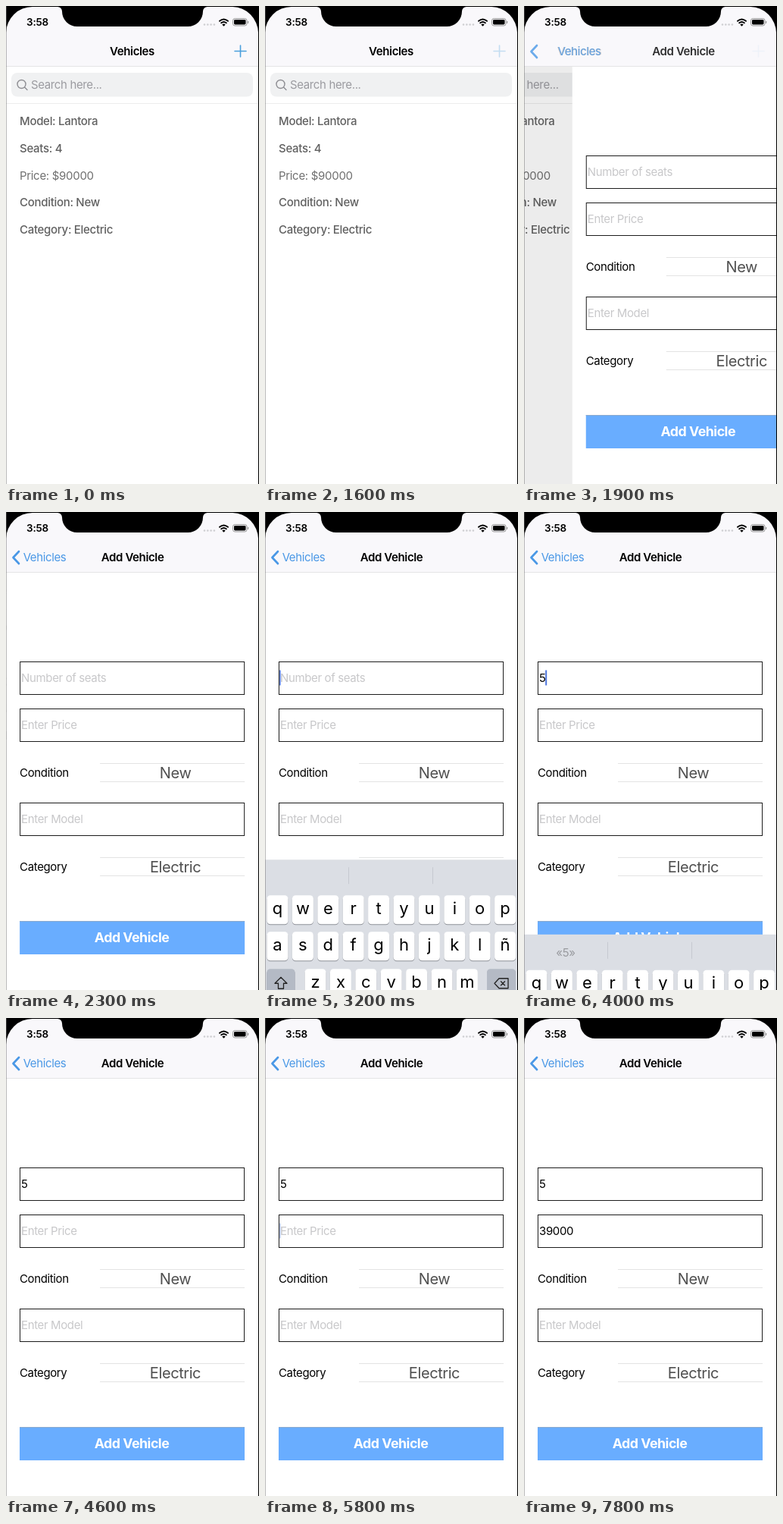
These frames come from a looping animation (334 px wide and 630 px high, 8000 ms). An HTML page:

```html
<!DOCTYPE html>
<html lang="en">
<head>
<meta charset="utf-8">
<title>Vehicles</title>
<style>
html, body { margin: 0; width: 100%; height: 100%; overflow: hidden; background: #fff }
svg { display: block; width: 334px; height: 630px }
text { font: 15px Inter, "Liberation Sans", sans-serif; letter-spacing: -.37px; white-space: pre }
.mid { text-anchor: middle }
.title { font-weight: 600 }
.cell { font-weight: 500; letter-spacing: -.3px; fill: #606060 }
.thin { font-weight: 400; fill: #707070 }
.hint { fill: #c8c8ca }
.pick { font-size: 20px; letter-spacing: -.4px; fill: #505050 }
.btn { font-size: 17.8px; font-weight: 700; letter-spacing: -.5px; fill: #fff }
.clock { font-size: 13.5px; font-weight: 600; letter-spacing: -.2px }
.key { font-size: 22px; letter-spacing: 0 }
.blue { fill: #4a98e6 }
.line { fill: none; stroke-linecap: round; stroke-linejoin: round }
</style>
</head>
<body>
<svg id="stage" viewBox="0 0 334 630"></svg>
<script>
const LOOP = 8000;
const text = (x, y, str, cls = '', extra = '') =>
  `<text x="${x}" y="${y}" class="${cls}" ${extra}>${str}</text>`;
const rect = (x, y, w, h, fill, extra = '') =>
  `<rect x="${x}" y="${y}" width="${w}" height="${h}" fill="${fill}" ${extra}/>`;
const line = (d, color, width) =>
  `<path class="line" d="${d}" stroke="${color}" stroke-width="${width}"/>`;

const cells = ['Model: Lantora', 'Seats: 4', 'Price: $90000', 'Condition: New', 'Category: Electric'];
const list = `<g id="list">
  ${rect(0, 80, 334, 550, '#fff')}
  ${rect(7, 88, 319, 31.5, '#f0f1f2', 'rx="8"')}
  ${line('M25 107.500l3 3M26 103a5.500 5.500 0 1 1-11 0a5.500 5.500 0 1 1 11 0', '#8e8e93', 1.4)}
  ${text(33, 108.5, 'Search here...', '', 'fill="#9b9ba0"')}
  ${rect(0, 128, 334, 1, '#ececec')}
  ${cells.map((s, i) => text(18, 157.3 + 35.7 * i, s, i == 2 ? 'cell thin' : 'cell')).join('')}
</g>`;

const field = (id, y, hint) =>
  rect(18.5, y + .5, 296, 43, '#fff', 'stroke="#1c1c1c"') +
  text(20, y + 27, hint, 'hint', `id="${id}Hint"`) +
  text(20, y + 27, '', '', `id="${id}"`);
const picker = (y, label, value) =>
  text(18, y + 18, label) + rect(124, y, 191, 1, '#e3e3e3') +
  rect(124, y + 24, 191, 1, '#e3e3e3') + text(223.5, y + 19.5, value, 'pick mid');
const form = `<g id="form">
  ${rect(0, 80, 334, 550, '#fff')}
  ${field('seats', 197, 'Number of seats')}
  ${field('price', 259, 'Enter Price')}
  ${picker(331, 'Condition', 'New')}
  ${field('model', 383, 'Enter Model')}
  ${picker(455, 'Category', 'Electric')}
  ${rect(18, 539, 297, 44, '#69adff')}${rect(18, 539, 297, 1, '#8aa9cd')}
  ${text(166, 567.3, 'Add Vehicle', 'btn mid')}
  ${rect(0, 0, 2, 20, '#4c74dc', 'id="caret"')}
</g>`;

const nav = rect(0, 0, 334, 79, '#f9f8fb') + rect(0, 79, 334, 1, '#e4e4e6') +
  `<g id="back">${line('M17 52l-7.500 8 7.500 8', '#4a98e6', 2.7)}</g>` +
  text(0, 65, 'Vehicles', 'title mid', 'id="oldTitle"') +
  text(0, 65, 'Vehicles', 'blue mid', 'id="backLabel"') +
  text(0, 65, 'Add Vehicle', 'title mid', 'id="newTitle"') +
  `<g id="plus">${line('M302 59.500h15M309.500 52v15', '#4a9fdc', 1.6)}</g>`;

const status = text(27, 26.3, '3:58', 'clock') +
  [262, 266.3, 270.6, 274.9].map(x => `<circle cx="${x}" cy="24.5" r="1.3" fill="#cfcfd2"/>`).join('') +
  line('M282 19.800q5.500-4.600 11 0M284.200 22.300q3.300-2.600 6.600 0', '#000', 1.9) +
  '<path d="M285.300 24.400q2.200-1.600 4.400 0l-2.200 2.300z"/>' +
  rect(299.5, 16.5, 18.5, 9.5, 'none', 'rx="2.7" stroke="#999"') +
  rect(301, 18, 15.5, 6.5, '#000', 'rx="1.4"') + rect(319, 19.7, 1.2, 3.2, '#999', 'rx=".6"');

// Key coordinates are relative to the keyboard's top edge.
const cap = (x, y, w, fill = '#fff') =>
  rect(x, y + 1, w, 38, '#8d9097', 'rx="4.500"') + rect(x, y, w, 38, fill, 'rx="4.500"');
const keyRow = (letters, x, y) => [...letters].map((c, i) =>
  cap(x + 33.4 * i, y, 28) + text(x + 14 + 33.4 * i, y + 24.5, c, 'key mid')).join('');
const keyboard = `<g id="keyboard">
  ${rect(0, 0, 334, 310, '#dbdee4')}
  ${rect(110, 10, 1, 22, '#c6c9d0')}${rect(221, 10, 1, 22, '#c6c9d0')}
  ${text(55, 29, '«5»', 'mid', 'id="suggestion"')}
  ${keyRow('qwertyuiop', 2.5, 47)}${keyRow('asdfghjklñ', 2.5, 95)}
  ${cap(2.5, 144, 37, '#b4bac5')}${keyRow('zxcvbnm', 52.5, 144)}${cap(293, 144, 38, '#b4bac5')}
  ${line('M21 155l-8 8h4.500v7h7v-7h4.500z', '#222', 1.3)}
  ${line('M303 163l6-6.500h12v13h-12zM311.500 160.500l5 5m0-5l-5 5', '#222', 1.3)}
  ${cap(2.5, 192, 78, '#b4bac5')}${cap(86, 192, 162)}${cap(253, 192, 78, '#b4bac5')}
</g>`;

const bezel = `<path d="M0 0V35A35 35 0 0 1 35 1H68a6 6 0 0 1 6 6A20 20 0 0 0 94 27H240A20 20 0 0 0 260 7
  a6 6 0 0 1 6-6H299A35 35 0 0 1 333 35V630h1V0z"/>` + rect(0, 0, .5, 630, '#777');

document.getElementById('stage').innerHTML =
  list + rect(0, 80, 334, 550, '#000', 'id="dim"') + form + keyboard + nav + status + bezel;

const el = id => document.getElementById(id);
const set = (id, attrs) => Object.entries(attrs).forEach(([k, v]) => el(id).setAttribute(k, v));
const clamp = v => Math.min(1, Math.max(0, v));

// Remaining distance (1 to 0) of a critically damped spring.
function spring(ms) {
  const p = 18.3 * Math.max(0, ms) / 1000;
  return (1 + p) * Math.exp(-p);
}

function typed(t, str, times) {
  return str.slice(0, times.filter(k => t >= k).length);
}

const caretResets = [2700, 2750, 3600, 4000, 4800, 6000, 6300, 6900, 7000, 7200];
function caretAlpha(t) {
  const age = t - caretResets.filter(k => k <= t).pop();
  return age < 800 ? clamp(1 - (age - 400) / 200) : clamp((age - 900) / 300);
}

function draw(t) {
  const away = t < 2400 ? spring(t - 1733) : 0, near = 1 - away;
  set('list', { transform: `translate(${-100 * near})` });
  set('dim', { opacity: .09 * near });
  set('form', { transform: `translate(${334 * away})` });
  set('back', { opacity: near });
  set('oldTitle', { x: 51 + 115.5 * away, opacity: away });
  set('backLabel', { x: 51 + 115.5 * away, opacity: near });
  set('newTitle', { x: 167 + 228 * away, opacity: near });
  set('plus', { opacity: t < 1600 ? 1 : .3 * away });

  const values = {
    seats: typed(t, '5', [3600]),
    price: typed(t, '39000', [6000, 6300, 6900, 7000, 7100])
  };
  for (const id in values) {
    el(id).textContent = values[id];
    set(id + 'Hint', { opacity: values[id] ? 0 : 1 });
  }
  const focus = t < 4800 ? 'seats' : 'price';
  set('caret', {
    x: 19 + 9.2 * values[focus].length,
    y: focus == 'seats' ? 208.5 : 270.5,
    opacity: t < 2700 ? 0 : caretAlpha(t)
  });

  const lowered = t < 3900 ? spring(t - 2995) : 1 - spring(t - 3918);
  set('keyboard', { transform: `translate(0 ${425 + 298 * lowered})` });
  set('suggestion', { opacity: t < 3700 ? 0 : t < 4000 ? 1 : .3 });
}

// The screen refreshes ten times a second.
function tick() {
  draw(Math.floor(performance.now() % LOOP / 100) * 100);
  requestAnimationFrame(tick);
}
tick();
</script>
</body>
</html>
```
